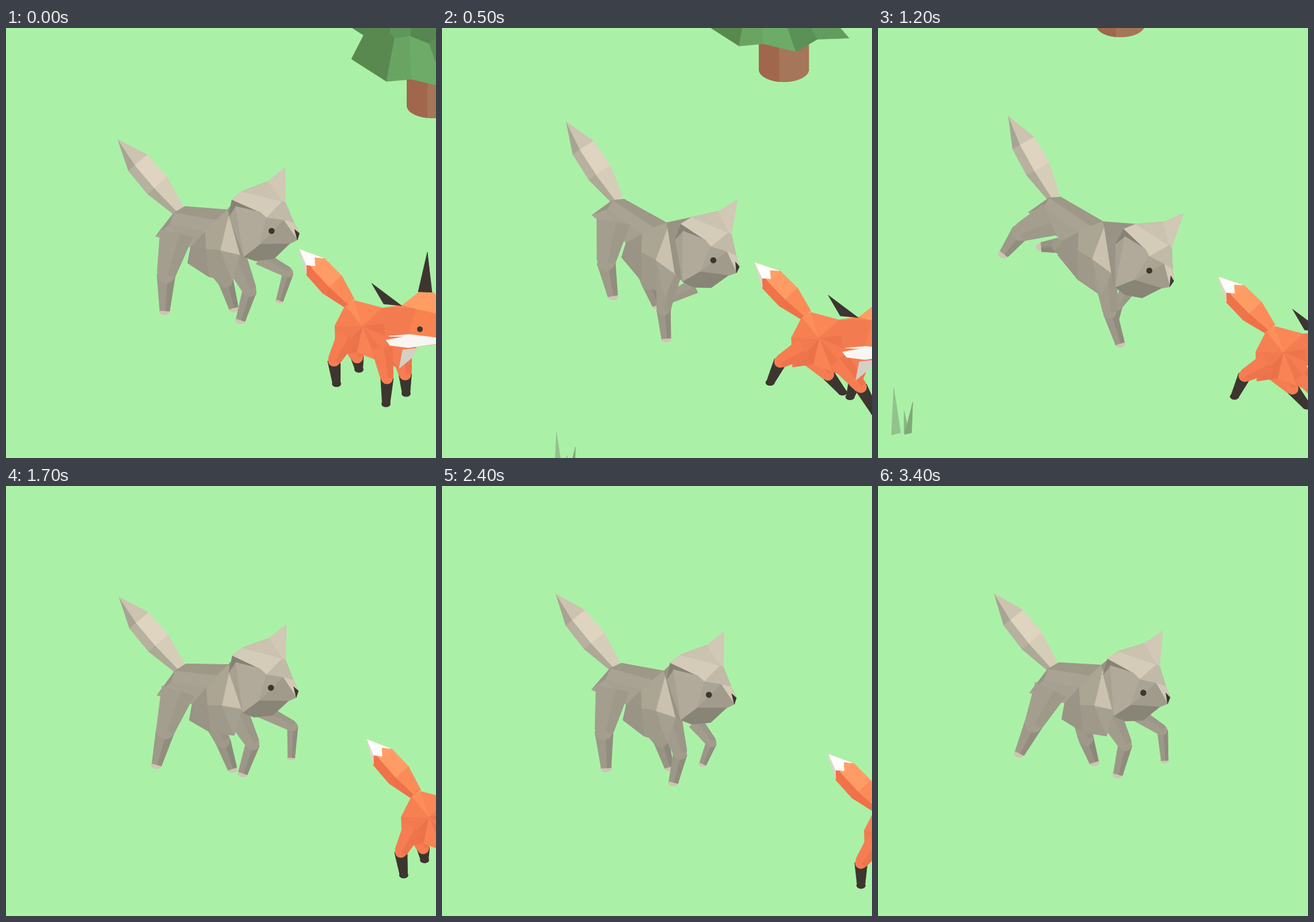
An HTML page with a canvas for the animation above (3500 ms loop, 748 by 748 pixels).

```html
<!DOCTYPE html>
<html>
<head>
<meta charset="utf-8">
<style>
html, body { margin: 0; width: 100%; height: 100%; overflow: hidden; background: #aaf1a7; }
canvas { display: block; }
</style>
</head>
<body>
<canvas id="stage" width="748" height="748"></canvas>
<script>
const ctx = document.getElementById('stage').getContext('2d');
const LOOP = 3500, STEP = 100, STRIDE = 825;
// Moments of the stride: plant, push, leap, land, gather
const KEYS = [0, 80, 325, 375, 500];
const DARK = '#3d352f';

// Each row: root x, y, body pitch, tail angle, eye x, y, head tilt
const WOLF_MOVES = [
  [300, 317, 0.1, 49.4, 462, 353, -0.2],
  [303, 315, 0, 50.5, 461, 355, 0],
  [304, 300, 1, 63.4, 470, 424, 1],
  [306, 295, 1.1, 60.8, 472, 422, 0.8],
  [305, 299, 1.05, 56.8, 472, 404, 0.3]
];
// Hip from the root, half widths, and the foot's path as x, y, knee bend
const WOLF_LEGS = {
  farHind: { hip: [47, 75], widths: [15, 13, 8], path: [[396, 487, -10], [385, 488, 0], [257, 375, 25], [284, 381, 10], [374, 482, 0]] },
  farFront: { hip: [142, 75], widths: [13, 9, 6], path: [[476, 474, -34], [501, 475, -27], [444, 513, 0], [410, 517, 8], [388, 518, 25]] },
  hind: { hip: [-3, 40], widths: [29, 16, 8.5], path: [[276, 492, 7], [252, 474, 0], [186, 355, 8], [219, 393, 13], [297, 466, 12]] },
  front: { hip: [98, 78], widths: [21, 12, 8], path: [[408, 508, -21], [415, 499, -22], [443, 548, 0], [421, 549, 6], [390, 540, 7]] }
};
// Vertices of the level wolf, from the root and from the eye
const WOLF_BODY = [
  [-39, 47], [-16, 26], [47, 35], [65, 14], [85, -5], [22, 63], [74, 66],
  [17, 91], [54, 113], [95, 118], [108, 72], [49, 66], [88, 3], [-8, 5], [11, -7]
];
const WOLF_HEAD = [
  [-64, -58], [-71, -30], [-18, -34], [-46, -71], [0, -86], [31, -109], [27, -47], [-7, -23], [39, -12], [47, 7],
  [43, 18], [-21, 22], [-59, -46], [-50, 42], [1, 48], [-31, 50], [29, 24], [22, -50], [22, -17]
];
// Faces: lightness in percent, then vertices
const BODY_FACES = '38 13 14 4 12 10 9 8 7 5 0|33 13 14 4 3|45 1 13 3 2|29 13 1 0|42 1 2 5|45 0 1 5|30 2 11 5|29 5 11 8 7|47 2 3 4 12 6 11|34 11 6 9 8';
const COLLAR_FACES = '42 6 10 9|78 12 6 10';
const HEAD_FACES = '43 0 3 4 6 8 9 10 16 14 15 13 1|10 1 12 2 0|88 0 3 17 7 2|79 3 4 17|85 4 5 6 17|70 7 17 6 8 18|53 12 2 7 11 13|46 7 18 11|86 18 8 9 10|37 11 18 10 16|12 11 16 14 15 13';

// Each row: root x, y, tail angle, stretch from standing to bounding
const FOX_MOVES = [
  [598, 479, 47, 0], [599, 480, 48, 0], [598, 488, 41, 0.4], [602, 484, 45, 1], [600, 483, 45.5, 1]
];
const FOX_LEGS = [
  { hip: [5, 70], stand: [16, 115], bound: [63, 134], bend: -2 },
  { hip: [90, 85], stand: [98, 157], bound: [76, 142], bend: -2 },
  { hip: [-5, 58], stand: [-23, 140], bound: [-63, 117], bend: 13 },
  { hip: [56, 78], stand: [63, 175], bound: [120, 170], bend: -5 }
];
const FOX_BODY = [[-8, 4], [8, -5], [57, 8], [100, 30], [116, 80], [85, 112], [45, 98], [12, 85], [-24, 90], [-26, 39]];
const FOX_SHADES = ['#ff8f5a', '#fb8656', '#f47c50', '#ee744c', '#f57d51', '#f0774d', '#f98354', '#ec724b', '#f27a4f', '#f78052'];
const FOX_HEAD = [
  [DARK, [[135, -89], [119, -20], [143, -19]]],
  ['#d5cfc6', [[92, 81], [118, 78], [108, 95], [86, 113]]],
  ['#f8834f', [[58, 8], [92, 3], [120, -19], [147, -18], [192, 66], [102, 77], [64, 66]]],
  ['#ff9d64', [[92, 3], [120, -19], [147, -18], [167, 21], [114, 9]]],
  ['#f37b50', [[58, 8], [114, 9], [102, 53], [63, 62]]],
  [DARK, [[38, -35], [59, 1], [90, 4]]],
  ['#f7f6f2', [[63, 64], [96, 58], [68, 57], [104, 54], [192, 65], [102, 77], [70, 73]]]
];

const CANOPY_RIM = [[-96, -103], [-35, -64], [8, -68], [66, -54], [104, -76], [160, -78]];
// Blades: tip x, tip y, base x, base y, half width
const GRASS = [['#94c28c', 27, 626, 31, 708, 8], ['#8ab583', 45, 666, 49, 705, 4], ['#7fa878', 60, 651, 52, 707, 6]];

const lerp = (a, b, u) => a + (b - a) * u;
const mix = (p, q, u) => p.map((v, i) => lerp(v, q[i], u));
const add = (p, q) => [p[0] + q[0], p[1] + q[1]];

// Smooth cyclic interpolation through the rows at KEYS
function moveAt(rows, phase) {
  const n = KEYS.length;
  const time = i => KEYS[(i + n) % n] + Math.floor(i / n) * STRIDE;
  let i = n - 1;
  while (KEYS[i] > phase) i--;
  const [ta, tb, tc, td] = [-1, 0, 1, 2].map(d => time(i + d));
  const [a, b, c, d] = [-1, 0, 1, 2].map(d => rows[(i + d + n) % n]);
  const h = tc - tb, u = (phase - tb) / h, v = 1 - u;
  return b.map((p, j) => {
    const m0 = (c[j] - a[j]) / (tc - ta) * h, m1 = (d[j] - p) / (td - tb) * h;
    return p * v * v * (1 + 2 * u) + c[j] * u * u * (3 - 2 * u) + m0 * u * v * v - m1 * u * u * v;
  });
}

function poly(color, points) {
  ctx.beginPath();
  for (const [x, y] of points) ctx.lineTo(x, y);
  ctx.closePath();
  ctx.fillStyle = ctx.strokeStyle = color;
  ctx.lineWidth = 0.8;
  ctx.lineJoin = 'round';
  ctx.fill();
  ctx.stroke();
}

function dot(color, [x, y], rx, ry = rx) {
  ctx.fillStyle = color;
  ctx.beginPath();
  ctx.ellipse(x, y, rx, ry, 0, 0, 7);
  ctx.fill();
}

function fur(percent) {
  const [r, g, b] = mix([124, 121, 108], [224, 214, 194], percent / 100);
  return `rgb(${r},${g},${b})`;
}

function mesh(faces, points) {
  for (const face of faces.split('|')) {
    const [light, ...ids] = face.split(' ');
    poly(fur(light), ids.map(i => points[i]));
  }
}

// Tapered segment, darker on its front half
function bone(a, wa, b, wb, color, shade) {
  const dx = b[0] - a[0], dy = b[1] - a[1], d = Math.hypot(dx, dy);
  const side = (p, w) => [p[0] - dy / d * w, p[1] + dx / d * w];
  poly(color, [side(a, wa), side(b, wb), side(b, -wb), side(a, -wa)]);
  poly(shade, [side(a, -wa * 0.2), side(b, -wb * 0.2), side(b, -wb), side(a, -wa)]);
}

function limb(hip, foot, bend, [w0, w1, w2], upper, lower, paw) {
  const dx = foot[0] - hip[0], dy = foot[1] - hip[1], d = Math.hypot(dx, dy);
  const knee = add(mix(hip, foot, 0.54), [-dy / d * bend, dx / d * bend]);
  dot(paw, foot, w2 + 1.5, w2 - 1);
  bone(knee, w1, foot, w2, ...lower);
  dot(upper[0], knee, w1 * 0.95);
  bone(hip, w0, knee, w1, ...upper);
}

// Faceted spindle; returns a function placing points on it
function tail(root, degrees, length, shades) {
  const a = degrees * Math.PI / 180, c = Math.cos(a), s = Math.sin(a);
  const place = (along, off) => {
    const back = (along - 1) * length;
    return [root[0] + c * back + s * off, root[1] + s * back - c * off];
  };
  const rings = [[0, 0], [0.33, 21.5], [0.65, 22.5], [1, 11]];
  for (let i = 1; i < 4; i++) {
    const [f0, w0] = rings[i - 1], [f1, w1] = rings[i];
    [[-1, -0.3], [-0.3, 1]].forEach(([l, r], k) => {
      poly(shades[(i + k * 3) - 1], [place(f0, w0 * l), place(f1, w1 * l), place(f1, w1 * r), place(f0, w0 * r)]);
    });
  }
  return place;
}

function drawWolf(phase) {
  const [rx, ry, pitch, tailAngle, ex, ey, tilt] = moveAt(WOLF_MOVES, phase);
  const onBody = ([x, y]) => [rx + x - 0.1 * pitch * y, ry + y + 0.5 * pitch * x];
  const onHead = ([x, y]) => [
    ex + x * (1 - 0.07 * tilt) - 0.35 * tilt * y,
    ey + y * (1 - 0.02 * tilt) + 0.3 * tilt * x
  ];
  const leg = (name, light) => {
    const { hip, widths, path } = WOLF_LEGS[name];
    const [x, y, bend] = moveAt(path, phase);
    limb(onBody(hip), [x, y], bend, widths, [fur(light + 6), fur(light)], [fur(light), fur(light - 12)], fur(82));
  };
  const body = WOLF_BODY.map(onBody), head = WOLF_HEAD.map(onHead);
  leg('farHind', 28);
  leg('farFront', 32);
  tail([rx, ry], tailAngle, 162, [45, 60, 50, 80, 98, 90].map(fur));
  mesh(BODY_FACES, body);
  leg('hind', 34);
  leg('front', 32);
  mesh(COLLAR_FACES, body);
  poly(fur(28), [body[4], body[12], body[10], head[13], head[2], head[3]]);
  mesh(HEAD_FACES, head);
  poly(DARK, [head[9], head[10], mix(head[9], head[18], 0.3)]);
  dot(DARK, [ex, ey], 5.3);
}

function drawFox(t, phase) {
  const [x, y, tailAngle, stretch] = moveAt(FOX_MOVES, phase);
  const leg = ({ hip, stand, bound, bend }) => limb(hip, mix(stand, bound, stretch), bend,
    [18, 11, 6.5], ['#f57d51', '#ee744c'], [DARK, DARK], DARK);
  ctx.save();
  ctx.translate(x + 67.6 * t + 40 * Math.max(0, t - 2.9), y + 33.5 * t);
  FOX_LEGS.slice(0, 2).forEach(leg);
  const place = tail([0, 0], tailAngle, 129, ['#ee7149', '#f07349', '#ee7149', '#ff9f68', '#ff9c65', '#fb8c59']);
  const zigzag = [-20, -10, 0, 10, 20].map((off, i) => place(i % 2 ? 0.22 : 0.31, off));
  poly('#fdfdfb', [place(0, 0), ...zigzag]);
  poly('#ddd5cb', [place(0, 0), zigzag[0], zigzag[1]]);
  FOX_BODY.forEach((p, i) => poly(FOX_SHADES[i], [p, FOX_BODY[(i + 1) % FOX_BODY.length], [22, 40]]));
  FOX_LEGS.slice(2).forEach(leg);
  for (const [color, points] of FOX_HEAD) poly(color, points);
  dot(DARK, [122, 45], 5);
  ctx.restore();
}

function drawTree() {
  ctx.fillStyle = '#a57659';
  ctx.fillRect(0, -80, 89, 60);
  dot('#a57659', [44.5, -22], 44.5, 22);
  ctx.save();
  ctx.beginPath();
  ctx.rect(0, -80, 36, 80);
  ctx.clip();
  ctx.fillStyle = '#a0674c';
  ctx.fillRect(0, -80, 36, 58);
  dot('#a0674c', [44.5, -22], 44.5, 22);
  ctx.restore();
  const crown = ([x, y]) => [x * 0.6, y - 75];
  for (const [lift, shades] of [[-55, ['#568752', '#5f965b']], [0, ['#59894f', '#69a463', '#6dab68', '#5a9157', '#629c5e']]])
    for (let i = 0; i < 5; i++) {
      const a = add(CANOPY_RIM[i], [0, lift]), b = add(CANOPY_RIM[i + 1], [0, lift]);
      poly(shades[i % shades.length], [a, b, crown(b), crown(a)]);
    }
}

function drawGround(t) {
  const x = (38.6 * t - 311) * t, y = (12.1 * t - 132) * t;
  ctx.save();
  ctx.translate(x + 318, y + 141);
  for (const [color, tipX, tipY, baseX, baseY, w] of GRASS)
    poly(color, [[tipX, tipY], [baseX - w, baseY], [baseX + w, baseY - w / 2]]);
  ctx.translate(379, 16);
  ctx.scale(1 - 0.04 * t, 1 - 0.04 * t);
  drawTree();
  ctx.restore();
}

function draw(ms) {
  const t = ms / 1000, phase = ms % STRIDE;
  ctx.fillStyle = '#aaf1a7';
  ctx.fillRect(0, 0, 748, 748);
  drawGround(t);
  drawFox(t, phase);
  drawWolf(phase);
}

const start = performance.now();
function tick() {
  const ms = (performance.now() - start) % LOOP;
  draw(Math.floor(ms / STEP) * STEP);
  requestAnimationFrame(tick);
}
tick();
</script>
</body>
</html>
```
